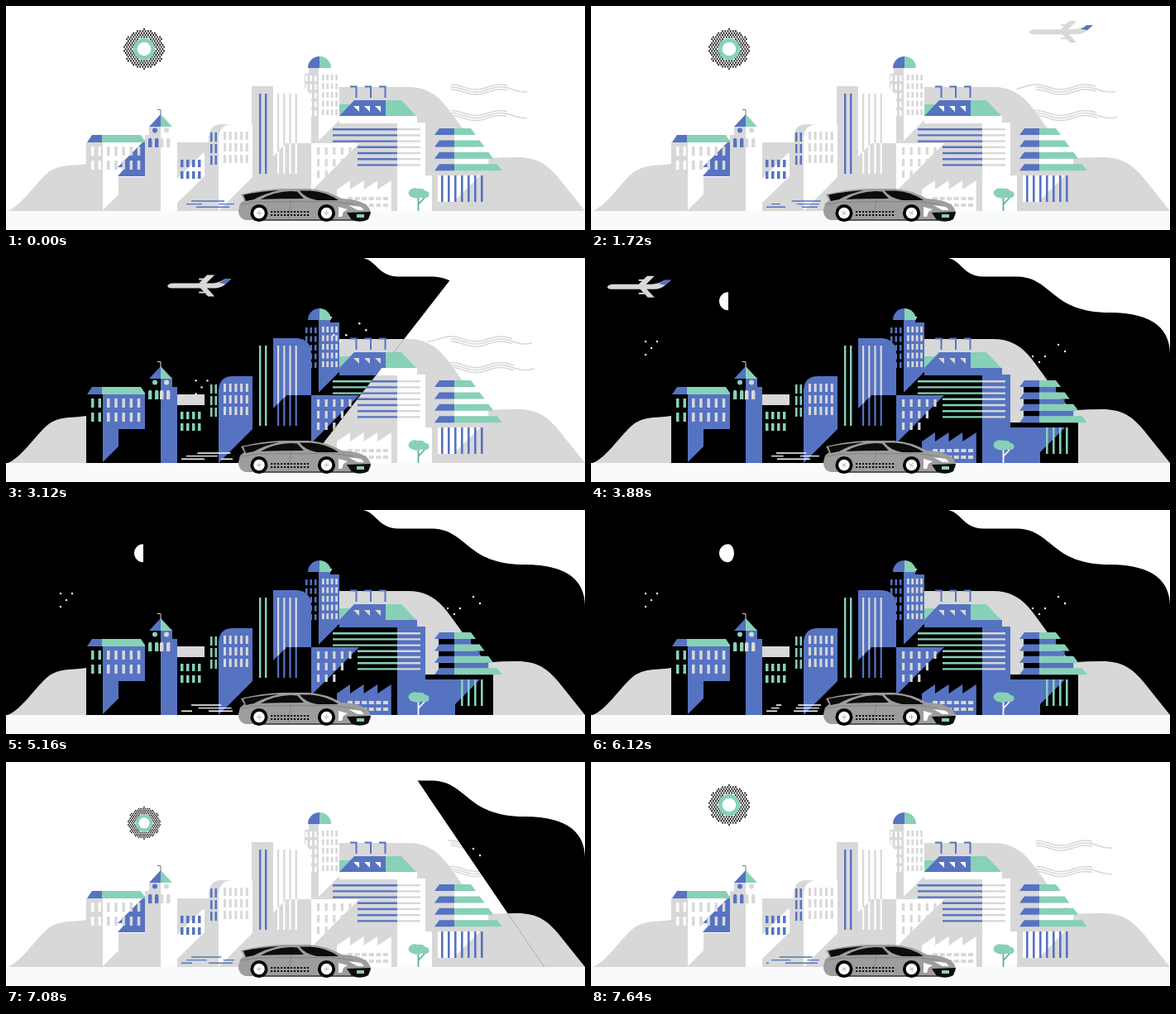
Recreate the animation shown at these times as an HTML page. Size 700 px wide and 271 px high, loop 7.68 s.

```html
<!DOCTYPE html>
<html lang="en">
<head>
<meta charset="utf-8">
<title>City day and night</title>
<style>
html, body { margin: 0; width: 100%; height: 100%; overflow: hidden; background: #fff; }
svg { display: block; width: 700px; height: 271px; }
</style>
</head>
<body>
<svg id="stage" viewBox="0 0 700 271"></svg>
<script>
const LOOP = 7680, GROUND = 248;
const GREY = '#d8d8d8', BLUE = '#5673c2', GREEN = '#87d1b7', INK = '#0c0c0c';

const path = (d, fill) => `<path d="${d}" fill="${fill}"/>`;
const rect = (x, y, w, h, fill) => path(`M${x} ${y}h${w}v${h}h${-w}z`, fill);
const dot = (x, y, r, fill) => `<circle cx="${x}" cy="${y}" r="${r}" fill="${fill}"/>`;
const line = (d, color, w = 2) => `<path d="${d}" fill="none" stroke="${color}" stroke-width="${w}"/>`;
const range = (n, f) => Array.from({ length: n }, (_, i) => f(i)).join('');
const span = (t, a, b) => Math.max(0, Math.min(1, (t - a) / (b - a)));

// Block standing on the ground
const block = (x, right, top, fill) => rect(x, top, right - x, GROUND - top, fill);
// Wall whose foot is cut at 45 degrees, lowest at the left
const cut = (x, right, top, foot, fill) =>
  path(`M${x} ${top}H${right}V${foot - right + x}L${x} ${foot}z`, fill);
// Two-tone roof: blue up to mid, green after it
const roof = (left, mid, right, y, h, slant) =>
  path(`M${left} ${y}H${mid}v${h}H${left - slant}z`, BLUE) +
  path(`M${mid} ${y}H${right}l${slant} ${h}H${mid}z`, GREEN);
const windows = (x, y, cols, rows, dx, dy, w, h, fill) =>
  range(rows, r => range(cols, c => rect(x + c * dx, y + r * dy, w, h, fill)));

const hills = () =>
  path('M2 248C18 242 34 217 48 204C62 191 76 194 97 191V248z', GREY) +
  path('M403 98H486C518 98 530 118 546 140S580 188 600 199V248H403z', GREY) +
  path('M560 188Q580 183 618 183C643 183 654 192 668 208L700 248H560z', GREY);

// Each building has a shaded left side and a lit right side
function city(night) {
  const face = night ? BLUE : '#fff', shade = night ? '#000' : GREY;
  const accent = night ? GREEN : BLUE, glow = night ? GREEN : '#fff';

  const hall = block(97, 187, 165, shade) + rect(117, 165, 51, 42, face) +
    cut(117, 136, 207, 247, face) + cut(135, 187, 195, 195, BLUE) +
    path('M145 194.5H187L176 206H135z', BLUE) + roof(104, 116, 163, 156, 9, 6) +
    windows(103, 170, 2, 2, 8.5, 17, 3.5, 11, glow) + windows(122, 170, 5, 2, 9.2, 17, 3.5, 11, GREY);

  const arch = (x, fill) => path(`M${x} 171v-9a2.2 2.2 0 0 1 4.4 0v9z`, fill);
  const side = (x, fill) => dot(x + 5, 150.5, 3, fill) + arch(x - 3, fill) + arch(x + 5, fill);
  const clock = block(168, 187, 156, shade) + rect(173, 145, 14, 12, shade) +
    block(187, 207, 156, face) + rect(187, 145, 14, 12, face) + roof(187, 187, 187, 131, 15, 14) +
    line('M183 125.5H187V132', night ? GREY : '#777', 1) + side(175, accent) + side(189, GREY);

  const office = block(207, 245, 165, shade) + rect(207, 165, 33, 13, GREY) +
    (night ? '' : path('M207 209L238 178H240V206L207 238z', '#fff')) +
    windows(211, 186, 4, 2, 7, 14, 3.5, 9, accent);

  const rounded = path('M245 248V160Q246 143 260 143H297V248z', shade) +
    path('M257 248V160Q258 143 274 143H298V207z', face) +
    windows(247, 153, 2, 3, 5.5, 14, 2.5, 11, accent) + windows(263, 152, 5, 3, 6.7, 14, 3, 10, GREY);

  const tower = rect(361, 82, 17, 84, shade) + rect(366, 74, 12, 8, shade) + rect(378, 74, 14, 5, face) +
    cut(378, 403, 78, 163, face) +
    windows(362, 84, 3, 5, 5.5, 10.5, 2.5, 7, night ? BLUE : '#fff') +
    windows(382, 83, 4, 5, 5.4, 10.5, 2.7, 7, GREY) +
    path('M365 75a14 14 0 0 1 14-14v14z', BLUE) + path('M379 61a14 14 0 0 1 14 14h-14z', GREEN);

  const slabs = block(297, 323, 97, shade) + block(323, 369, 166, shade) +
    path('M323 182V97H351Q369 98 369 116V166H339z', face) +
    windows(306, 106, 2, 1, 7, 0, 2.4, 97, accent) +
    windows(328, 106, 4, 1, 7.2, 0, 2.2, 97, night ? BLUE : '#fff') +
    range(4, i => rect(328 + i * 7.2, 106, 2.2, Math.max(60, 70 - i * 7), GREY));

  const mall = path('M403 138L375 166V248H473V138z', shade) +
    block(473, 507, 141, face) + rect(403, 133, 94, 9, face) +
    path('M403 119H417L403 134z', GREEN) + roof(421, 459, 478, 114, 19, 18) +
    range(3, i => line(`M${416 + i * 17.5} 97.5h7.5V111`, BLUE) +
      path(`M${420 + i * 13} 121h7v7z`, night ? GREY : '#fff')) +
    range(7, i => {
      const x = i < 3 ? 395 : 425, y = 148 + i * 7.2;
      return rect(x, y, 473 - x, 2.4, accent) + rect(473, y, 28, 2.4, GREY);
    });

  const flats = block(369, 400, 166, shade) + cut(369, 427, 166, 224, face) +
    range(3, r => windows(376, 171 + r * 14, 5 - r, 1, 9.6, 0, 3.2, 9, GREY));

  const factory = path('M400 248V222' + range(4, i => `L${416 + i * 16.6} 211v11`) + 'V248z', face) +
    windows(413, 231, 6, 2, 8.6, 8, 6, 4, GREY);

  const tiers = range(4, i => {
    const y = 148 + i * 14.4, right = 562 + i * 10.6;
    return (i < 3 ? rect(523, y + 8, 19, 7, shade) + rect(542, y + 8, right - 542, 7, face) : '') +
      roof(524, 542, right, y, 8, 6);
  });
  const pagoda = (night ? block(507, 589, 199, '#000') : '') +
    block(473, night ? 543 : 515, 205, face) + cut(543, 573, 205, 235, face) +
    (night ? '' : rect(522, 205, 21, 32, face)) + tiers +
    windows(night ? 550 : 526, 205, night ? 4 : 7, 1, 8, 0, 2.6, 32, accent);

  const tree = line('M498.5 248V231M498.5 240L506 232', night ? '#fff' : '#5bae9c', 1.8) +
    path('M490 231a5 5 0 0 1-1-9q4-3 9-1q7-1 9 3a4 4 0 0 1 1 8h-7q-5 2-11-1z', GREEN);

  return tower + slabs + rounded + office + hall + clock + mall + flats + factory + pagoda + tree;
}

const sun = range(21, r => range(21, c => {
  const x = (c - 10) * 3.2 + (r % 2) * 1.6, y = (r - 10) * 2.4, d = Math.hypot(x, y);
  return d > 13 && d < 24.2 ? dot(x, y, 1.1, '#111') : '';
})) + `<circle r="10.8" fill="#fff" stroke="${GREEN}" stroke-width="5"/>`;

const streaks = color => `<g class="streaks" stroke="${color}" stroke-width="1.4">` +
  range(3, i => `<path d="M${224 - i * 6} ${236 + i * 3.6}H${278 - i * 2}"/>`) + '</g>';

const stars = (...points) => points.map(([x, y]) => dot(x, y, 1.2, '#fff')).join('');

const wheel = x => dot(x, 250.5, 10.5, '#000') + dot(x, 250.5, 6.8, '#fff') +
  `<g class="wheel" data-x="${x}">` + line('M-3 0H3M0-3V3', '#bbb', 1) + '</g>';

const car =
  path('M281 247L283 239L288 235L284 228Q308 222 334 221H366Q386 222 406 233Q426 234 435 240Q441 245 441 252L438 258Q434 261 420 259H290Q281 257 281 247z', '#9d9d9d') +
  path('M287 228.5Q308 224 330 223Q312 227 300 234L290 236z', INK) +
  path('M308 234Q322 225 344 224L352 224.5L360 233Q330 233 308 234z', INK) +
  path('M355 223.5H368Q388 225 402 235H376Q361 232 355 223.5z', INK) +
  line('M284 240L303 237L395 236.5L420 240M345 234L341 257', '#777', .7) +
  windows(320, 248, 12, 2, 4, 4, 2.2, 2, INK) +
  path('M402 243l11 3l-5 3l-2 6h-4z', '#fff') + path('M414 241l15 2l4 4h-8z', '#fff') +
  path('M412 250L441 249L438 258Q430 263 418 259z', INK) + rect(424, 252, 9, 4, GREEN) +
  line('M300 259H420', '#333', 1.5) + wheel(306) + wheel(387.5);

const plane = path('M38 11L48 1H57L46 12zM38 15H46L57 27H49z', GREY) +
  path('M0 14Q2 11 7 11H54Q64 10 69 6H77L71 11Q66 17 56 17H5Q0 17 0 14z', GREY) +
  path('M62 10.5Q66 9 69 6H77L70 12z', BLUE) + windows(38, 5, 1, 2, 0, 16, 7, 2, GREY);

const stage = document.getElementById('stage');
stage.innerHTML = `
  <clipPath id="wipe"><polygon id="edge"/></clipPath>
  <clipPath id="sky"><path d="M0 0H432C449 4 450 22 474 22.5H516C558 24 556 66 627 66C682 66 700 88 700 116V248H0z"/></clipPath>
  <rect y="248" width="700" height="23" fill="#f9fafc"/>
  <g id="sun">${sun}</g>${hills()}<g id="wind"></g>${city(false)}${streaks(BLUE)}
  <g clip-path="url(#wipe)"><g clip-path="url(#sky)">
    <rect width="700" height="248"/>
    <g id="moon"></g>${hills()}${city(true)}${dot(393, 72, 1, '#fff')}
    <g id="west">${stars([66, 101], [80, 101], [73, 109], [66, 117])}</g>
    <g id="east">${stars([565, 105], [573, 113], [549, 119], [534, 119], [542, 126])}</g>
    ${streaks('#fff')}
  </g></g>
  <g id="plane">${plane}</g>${car}`;

const el = id => document.getElementById(id);
const move = (id, x, y, s = 1) => el(id).setAttribute('transform', `translate(${x} ${y}) scale(${s})`);
const lineSets = document.querySelectorAll('.streaks'), wheels = document.querySelectorAll('.wheel');

// Night comes in from the left, then day follows it with the opposite slant
function wipe(t) {
  if (t < 2440 || t > 7400) return '0,0';
  if (t < 6400) {
    const x = (t - 2440) * .82;
    return `-900,0 ${x},0 ${x - 211},271 -900,271`;
  }
  const x = -170 + 790 * ((t - 6400) / 880) ** .743;
  return `${x},0 1200,0 1200,271 ${x + 184},271`;
}

function wind(t) {
  const grow = Math.min(1, 1 - Math.cos(2 * Math.PI * t / LOOP));
  const wave = (a, b, y) => {
    let d = '';
    for (let x = a; x <= b; x += 2) d += `${d ? 'L' : 'M'}${x} ${y - 3 * Math.cos((x - 538) / 9.5)}`;
    return line(d, GREY, 1.6);
  };
  const gust = (y, reach) => range(3, i =>
    wave(538 - (i ? 0 : reach * grow), 606 + (i === 1 ? 24 : 0) + reach / 4 * grow, y + i * 3));
  return gust(98, 28) + gust(129.5, 32);
}

function draw(now) {
  const t = Math.floor(now % LOOP / 40) * 40;
  el('edge').setAttribute('points', wipe(t));
  el('wind').innerHTML = wind(t);

  const u = span(t, 780, 4330), x = 702 - 782 * u + 333 * u * (1 - u) ** 3;
  move('plane', x, 21 - x / 140);

  const rise = t < 5000 ? 1 : 1 - (1 - span(t, 6640, 7440)) ** 2;
  move('sun', 167, 160 - 108 * rise, rise);

  const wax = 11 * span(t, 5640, 6400) || .01;
  move('moon', 166, 52.3, span(t, 3300, 3800));
  el('moon').innerHTML = path(`M0-11A11 11 0 0 0 0 11A${wax} 11 0 0 0 0-11z`, '#fff');

  const drift = (1 - span(t, 3080, 3900)) ** 3;
  move('west', 190 * drift, 55 * drift);
  move('east', -160 * drift, -30 * drift);

  lineSets.forEach(set => [...set.children].forEach((p, i) => {
    p.setAttribute('stroke-dasharray', '40 20');
    p.setAttribute('stroke-dashoffset', t / LOOP * 60 * (12 + 2 * i) + i * 21);
  }));
  wheels.forEach(w => w.setAttribute('transform', `translate(${w.dataset.x} 250.5) rotate(${t / LOOP * 360 * 16})`));
}

const start = performance.now();
function tick() {
  draw(performance.now() - start);
  requestAnimationFrame(tick);
}
tick();
</script>
</body>
</html>
```
